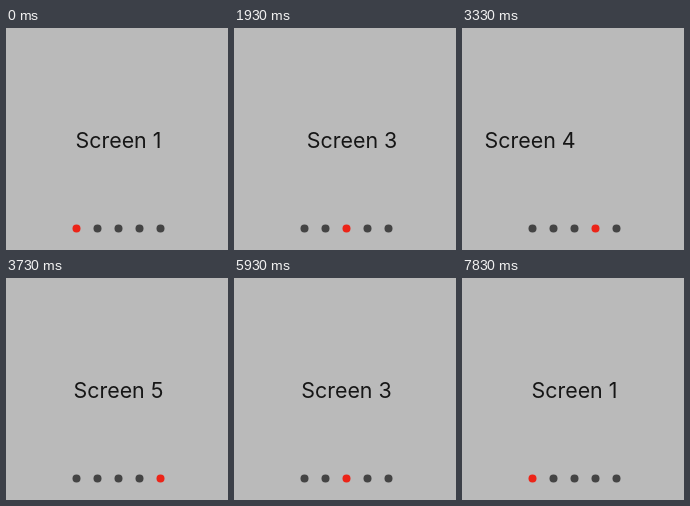
Animation, 222 px wide and 222 px high, one loop 8630 ms. Source, as an HTML page:

```html
<!DOCTYPE html>
<html lang="en">
<head>
<meta charset="utf-8">
<style>
  html, body { margin: 0; width: 100%; height: 100%; overflow: hidden; background: #bababa; }
  svg { display: block; width: 222px; height: 222px; }
  text { font: 21.4px Inter, Roboto, sans-serif; text-anchor: middle; fill: #161616; }
</style>
</head>
<body>
<svg viewBox="0 0 222 222">
  <g id="pages"></g>
  <g id="dots"></g>
</svg>
<script>
const LOOP = 8630, PAGE = 222, STEP = 100, COUNT = 5;

// Scroll progress per 100 ms step
const glide = [0.2, 0.62, 0.876, 0.975, 1];
const slowGlide = [0.08, 0.35, 0.72, 0.9, 0.98, 1];
const lateGlide = [0.2, 0.62, 0.876, 0.975, 0.995, 0.995, 1];

const slides = [
  { at: 630, to: 1 },
  { at: 1630, to: 2 },
  { at: 2530, to: 3 },
  { at: 3330, to: 4 },
  { at: 4430, to: 3 },
  { at: 5330, to: 2, curve: lateGlide },
  { at: 6230, to: 1, curve: slowGlide },
  { at: 7230, to: 0 },
];

function add(parent, tag, attrs) {
  const el = document.createElementNS("http://www.w3.org/2000/svg", tag);
  for (const name in attrs) el.setAttribute(name, attrs[name]);
  return parent.appendChild(el);
}

const pages = document.getElementById("pages");
const dotGroup = document.getElementById("dots");
const dots = [];
for (let i = 0; i < COUNT; i++) {
  add(pages, "text", { x: 112.5 + i * PAGE, y: 120 }).textContent = `Screen ${i + 1}`;
  dots.push(add(dotGroup, "circle", { cx: 70.5 + i * 21, cy: 200.5, r: 4 }));
}

function position(t) {
  let pos = 0;
  for (const { at, to, curve = glide } of slides) {
    if (t < at) break;
    const step = Math.min(Math.floor((t - at) / STEP), curve.length - 1);
    pos += (to - pos) * curve[step];
  }
  return pos;
}

function draw(now) {
  const pos = position(now % LOOP);
  pages.setAttribute("transform", `translate(${-pos * PAGE} 0)`);
  dots.forEach((dot, i) => dot.setAttribute("fill", i === Math.round(pos) ? "#ec2418" : "#444"));
  requestAnimationFrame(draw);
}
draw(performance.now());
</script>
</body>
</html>
```
